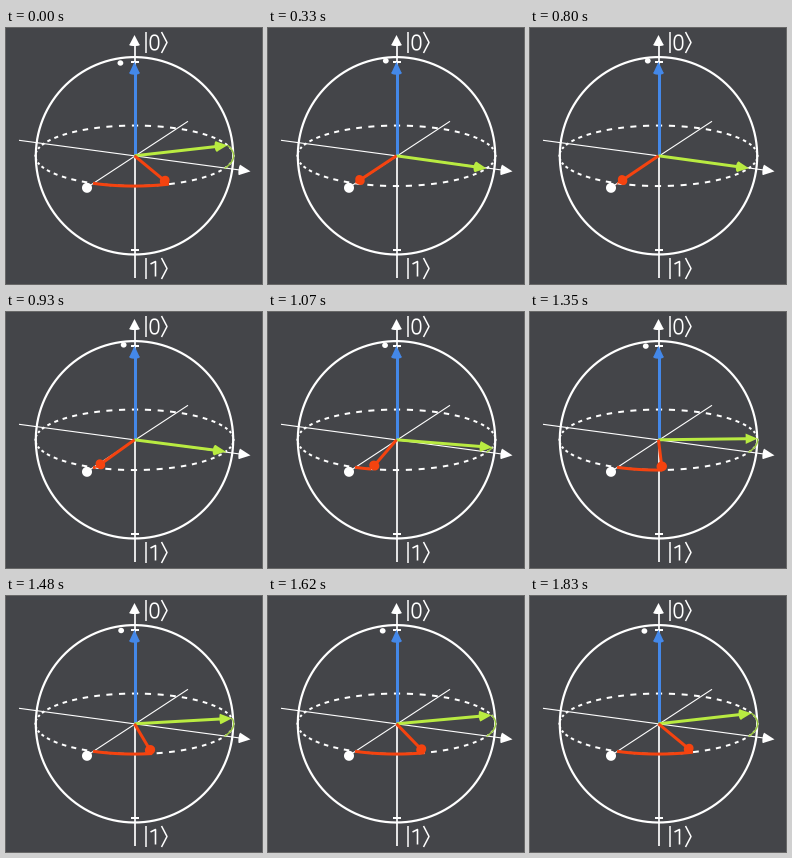
Animation of 256x256 px, one loop 2030 ms. Source, as a matplotlib script:

```python
import numpy as np
import matplotlib.pyplot as plt
from matplotlib.animation import FuncAnimation

SIZE, DPI = 256, 100
LOOP, TICK = 2030, 10          # ms
RESET, START = 330, 800        # ms
STEP, STEPS = 68.67, 16
TURN = np.pi / 4

BG = "#444549"
WHITE, BLUE, GREEN, RED = "#ffffff", "#4488e8", "#b9eb41", "#f5430f"
ARC_GREEN = "#9cc940"

O = np.array([128.5, 127.8])
R = 98.7
X = np.array([-41.5, 27.5])    # projected unit axes
Y = np.array([90.0, 12.6])
Z = np.array([0.0, -94.0])

fig = plt.figure(figsize=(SIZE / DPI, SIZE / DPI), dpi=DPI, facecolor=BG)
ax = fig.add_axes([0, 0, 1, 1])
ax.set_xlim(0, SIZE)
ax.set_ylim(SIZE, 0)
ax.axis("off")


def line(pts, color=WHITE, px=1.0, z=2, cap="butt"):
    pts = np.asarray(pts, float)
    return ax.plot(pts[:, 0], pts[:, 1], color=color, lw=px * 72 / DPI, zorder=z,
                   solid_capstyle=cap, solid_joinstyle="round")[0]


def shape(color, z):
    return ax.fill([0, 0, 0], [0, 0, 0], color=color, lw=0, zorder=z)[0]


def oval(center, rx, ry, n=60):
    a = np.linspace(0, 2 * np.pi, n)
    return np.c_[center[0] + rx * np.cos(a), center[1] + ry * np.sin(a)]


def on_equator(a):
    a = np.atleast_1d(a)[:, None]
    return O + np.cos(a) * X + np.sin(a) * Y


class Cone:
    """Arrow head with a round base, seen in perspective-free projection."""

    def __init__(self, color, z, radius=5.2):
        self.base, self.side = shape(color, z), shape(color, z)
        self.radius = radius

    def aim(self, tip, length, tilt):
        v = tip - O
        u = v / np.hypot(*v)
        n = np.array([-u[1], u[0]])
        c = tip - u * length
        a = np.linspace(0, 2 * np.pi, 40)[:, None]
        r = self.radius
        self.base.set_xy(c + r * np.cos(a) * n + r * tilt * np.sin(a) * u)
        self.side.set_xy([c + r * n, tip, c - r * n])


class Vector:
    def __init__(self, color, z):
        self.shaft = line([O, O], color, 3, z)
        self.head = Cone(color, z + 0.1)

    def point(self, v):
        size = np.hypot(*v)
        tilt = np.sqrt(max(0, 1 - (size / 99) ** 2))
        end = O + 0.9 * v
        self.shaft.set_data([O[0], end[0]], [O[1], end[1]])
        self.head.aim(O + v, 0.12 * size, tilt)


def ket(x, y, digit):
    line([(x, y), (x, y + 21)], px=1.5)
    line([(x + 15.5, y), (x + 21, y + 10.5), (x + 15.5, y + 21)], px=1.5)
    if digit == 0:
        a = np.linspace(0, 2 * np.pi, 60)
        c, s = np.cos(a), np.sin(a)
        px = x + 8.5 + 4.2 * np.sign(c) * np.abs(c) ** 0.8
        py = y + 10.5 + 7.3 * np.sign(s) * np.abs(s) ** 0.8
        line(np.c_[px, py], px=1.6)
    else:
        line([(x + 4.5, y + 6), (x + 9.5, y + 3.5), (x + 9.5, y + 18.5)], px=1.6)


# sphere outline and dashed equator
line(oval(O, R, R, 240), px=2.2, z=3)
ring = np.linspace(0, 2 * np.pi, 2401)
dashes = on_equator(ring)
dashes[np.sin(48 * ring) < 0] = np.nan
line(dashes, px=2)

# axes
line([(128.5, 14), (128.5, 250)], px=1.7)
line([(13, 112.3), (236, 142.3)], px=1.1)
line([(182, 93.3), (81, 159.5)], px=1.1)
line([(124.5, 33.5), (132.5, 33.5)], px=2)
line([(124.5, 222), (132.5, 222)], px=2)
Cone(WHITE, 3).aim(np.array([128.5, 7.0]), 10, 0.2)
Cone(WHITE, 3).aim(np.array([244.5, 143.4]), 11, 0.2)
ball = shape(WHITE, 3)
ball.set_xy(oval((81, 159.8), 5, 5))
ket(140, 4, 0)
ket(140, 230, 1)

# moving parts
marker = shape(WHITE, 4)
green_arc = line([O, O], ARC_GREEN, 1.5, 3.5)
red_arc = line([O, O], RED, 3, 5)
blue = Vector(BLUE, 6)
green = Vector(GREEN, 7)
red = Vector(RED, 8)
blue.point(Z)


def progress(t):
    if t < RESET:
        return 1.0
    if t < START:
        return 0.0
    k = min(int((t - START + 6.9) / STEP) + 1, STEPS)
    return (1 - np.cos(np.pi * k / STEPS)) / 2


def draw(i):
    p = progress(i * TICK)
    a = p * TURN
    red.point(on_equator(a)[0] - O)
    green.point(on_equator(a + np.pi / 2)[0] - O)
    sweep = np.linspace(0, a, 40)
    red_arc.set_data(*on_equator(sweep).T)
    green_arc.set_data(*on_equator(sweep + np.pi / 2).T)
    red_arc.set_visible(p > 0)
    green_arc.set_visible(p > 0)
    marker.set_xy(oval((117.8 - 3.4 * p, 32.8 + 2.2 * p), 2.9, 2.7))
    return []


anim = FuncAnimation(fig, draw, frames=LOOP // TICK, interval=TICK,
                     repeat=True, repeat_delay=0, blit=False)
plt.show()
```
